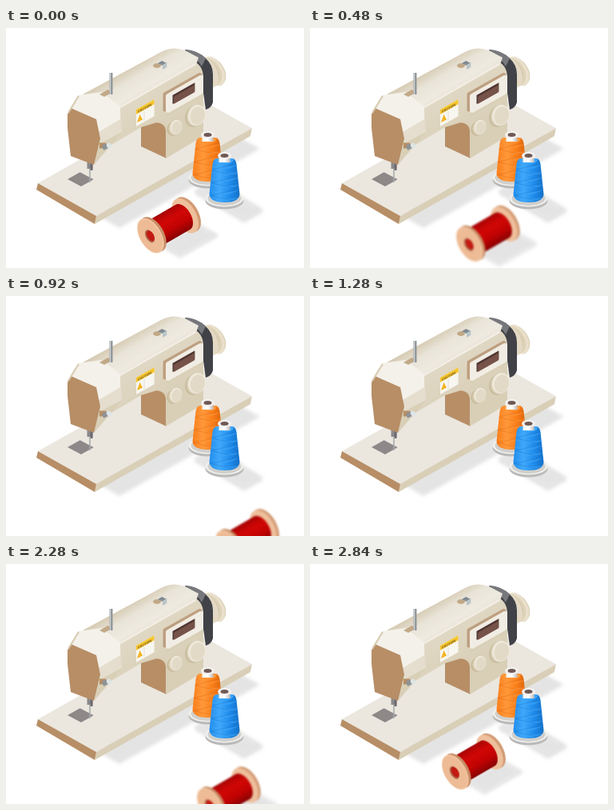
Write an HTML page with a canvas that moves like this. It is 373 px wide and 300 px high and loops after 2.88 s.

```html
<!DOCTYPE html>
<html>
<head>
<meta charset="utf-8">
<style>
html, body { margin: 0; width: 100%; height: 100%; overflow: hidden; background: #fff; }
canvas { display: block; width: 373px; height: 300px; }
</style>
</head>
<body>
<canvas id="stage" width="373" height="300"></canvas>
<script>
const W = 373, H = 300, LOOP = 2880;
const TILT = -Math.PI / 6;
const AXIS = { x: 0.87, y: -0.49 };
const BROWN = '#b78e66', SHADE = '#e4e4e4', CREAM = '#f1ede4', BEIGE = '#d9cfb7', TAN = '#c8bb9b';

const newLayer = () =>
  Object.assign(document.createElement('canvas'), { width: W, height: H }).getContext('2d');
const stage = document.getElementById('stage').getContext('2d');
const backdrop = newLayer(), spool = newLayer();
let g = backdrop;

function shape(fill, path) {
  g.fillStyle = fill;
  g.fill(new Path2D(path));
}

// The edge (x1, y1)-(x2, y2) swept along the machine's long axis.
function sweep(fill, x1, y1, x2, y2, length, rounding = 0) {
  const dx = length * AXIS.x, dy = length * AXIS.y;
  const quad = new Path2D(`M${x1} ${y1}L${x2} ${y2}l${dx} ${dy}L${x1 + dx} ${y1 + dy}Z`);
  g.fillStyle = g.strokeStyle = fill;
  g.fill(quad);
  if (rounding) {
    g.lineJoin = 'round';
    g.lineWidth = rounding;
    g.stroke(quad);
  }
}

function oval(fill, x, y, rx, ry, tilt = 0) {
  g.beginPath();
  g.ellipse(x, y, rx, ry, tilt, 0, Math.PI * 2);
  g.fillStyle = fill;
  g.fill();
}

function line(color, width, x, y, dx, dy) {
  g.strokeStyle = color;
  g.lineWidth = width;
  g.beginPath();
  g.moveTo(x, y);
  g.lineTo(x + dx, y + dy);
  g.stroke();
}

function ramp(x1, y1, x2, y2, ...colors) {
  const r = g.createLinearGradient(x1, y1, x2, y2);
  colors.forEach((c, i) => r.addColorStop(i / (colors.length - 1), c));
  return r;
}

function blurred(radius, draw) {
  g.save();
  g.filter = `blur(${radius}px)`;
  draw();
  g.restore();
}

function drawBase() {
  blurred(2, () => {
    sweep(SHADE, 90, 220, 142, 250, 202);
    sweep(SHADE, 240, 205, 298, 239, 22, 8);
  });
  sweep('#ebe7df', 40, 194, 113, 235, 224);
  sweep(BEIGE, 113, 235, 111, 245, 224);
  shape(BROWN, 'M40 194L113 235L111 245L38 202Z');
  sweep('#8e8889', 77, 189, 94, 198, 18);
}

function drawWheel() {
  const rings = [[262, 18, TAN], [260, 20, '#e9dfca'], [257, 18, '#ddd1b7'], [255, 16, TAN], [251, 21, '#e3d9c4']];
  for (const [x, r, color] of rings) oval(color, x, 54 + (262 - x) * 0.1, r * 0.62, r, TILT);
}

function drawArm() {
  shape('#414247', 'M224 27Q240 28 250 38Q259 46 259 58V93Q257 100 250 102L244 60Q240 42 224 34Z');
  shape('#77787c', 'M224 27Q240 28 250 38L245 48Q238 36 224 33Z');
  shape(BROWN, 'M169 120L196 110L204 122L201 163L169 148Z');
  shape(BEIGE, 'M200 163V128Q199 119 188 118L247 80V135Z');
  shape(ramp(165, 65, 210, 130, '#e2dac8', BEIGE),
    'M140 98L236 42Q246 47 247 60V103L205 124Q199 117 189 118L169 124L132 146Z');
  shape(ramp(150, 50, 175, 92, '#d4c8af', '#e9e4d8', '#eeeae0', '#e6dfd1'),
    'M96 83L194 30Q209 22 224 28L241 37L238 46L143 100Z');
  line('#f4f0e8', 1.6, 143, 99, 94, -54);
}

function drawHead() {
  line('#8b898c', 7, 105, 164, 0, 12);
  line('#6c6a70', 3, 107, 166, 0, 12);
  line('#a9a9ad', 1.6, 105, 176, 0, 17);
  shape(BEIGE, 'M117 138L145 130L132 146L110 171Z');
  shape('#e5decf', 'M113 114L143 98L145 130L118 144Z');
  shape('#f4f1ea', 'M90 84L120 80L143 98L143 114L116 130L113 114L80 100Z');
  shape(BROWN, 'M81 100L113 114L118 138L110 171L81 160L77 125V108Z');
  line('#d8cbb1', 2, 78, 106, 13, -21);
  line(BROWN, 7, 117, 147, 8, 0);
  line('#8c9296', 6, 121, 150, 6, -3);
  oval('#dfe4e6', 129, 147, 3, 3.5, TILT);
}

function drawFittings() {
  sweep('#c2a988', 117, 83, 123, 86, 12);
  line('#8f9598', 4, 131.5, 56, 0, 27);
  line('#d0d6d8', 1.3, 130.5, 56, 0, 27);
  oval('#c2a988', 189, 47, 5, 3);
  sweep('#7f8b91', 190, 44, 196, 47, 6);
  sweep('#b9c4c8', 196, 46, 196, 52, 6);
}

function drawLabel() {
  sweep('#f8f6f0', 163, 102, 163, 123, 26);
  sweep('#f6c52c', 163, 102, 163, 108, 26);
  shape('#f0b51e', 'M164 118L167.5 108L171 114.5Z');
  line('#d9d4cc', 0.7, 173, 104, 0, 12);
  g.save();
  g.transform(1, -0.52, 0, 1, 165, 106);
  g.fillStyle = '#765c24';
  g.font = 'bold 4px Roboto, sans-serif';
  g.fillText('CAUTION', 0, 0);
  g.restore();
}

function drawPanel() {
  sweep('#bd9f80', 199, 83, 199, 102, 50, 5);
  sweep(BEIGE, 203, 87, 203, 106, 47, 5);
  sweep(CREAM, 203, 85, 203, 103, 47, 6);
  sweep('#4f3632', 208.5, 84, 208.5, 95, 32);
  sweep('#765249', 210, 86, 210, 95, 30);
}

function drawKnob(x, y, r) {
  [TAN, BEIGE, '#f0eadc'].forEach((color, i) => oval(color, x - 4 + 2 * i, y + 2 - i, r * 0.83, r, 0.25));
  oval('#e2d9c6', x + 0.8, y + 0.6, r * 0.7, r * 0.88, 0.25);
}

function drawCone(x, y, light, main, dark) {
  oval('#b9b9b9', 0 + x, y + 55, 24, 10.5);
  oval('#f0efec', x, y + 52, 24, 10.5);
  oval('#d0cfcc', x, y + 52, 21, 9);
  g.save();
  g.translate(x, y);
  const cone = new Path2D('M-10 2Q-14 3 -15 9L-19 47Q-18 57 0 57Q18 57 19 47L15 9Q14 3 10 2Z');
  g.fillStyle = ramp(-19, 0, 19, 0, main, light, main, dark);
  g.fill(cone);
  g.clip(cone);
  oval(light, 0, 4, 11, 5);
  g.globalAlpha = 0.5;
  for (let i = 0; i < 6; i++) {
    const top = 8 + i * 8, side = i % 2 ? 1 : -1;
    shape(light, `M${-20 * side} ${top}Q0 ${top + 14} ${20 * side} ${top + 2}Q0 ${top + 8} ${-20 * side} ${top}`);
    line(dark, 0.7, -20 * side, top, 40 * side, 9);
  }
  g.restore();
  line(ramp(x - 8, 0, x + 8, 0, '#f5f1ed', '#fff', '#b8b1ad'), 14, x, y - 1, 0, 8);
  oval('#f4f1ef', x, y - 1.5, 8.5, 4.5);
  oval('#6f5954', x, y - 1.5, 5, 2.5);
}

function drawBackdrop() {
  g.fillStyle = '#fff';
  g.fillRect(0, 0, W, H);
  drawBase();
  drawWheel();
  drawArm();
  drawHead();
  drawFittings();
  drawLabel();
  drawPanel();
  drawKnob(239, 109, 13);
  drawKnob(213, 124, 9);
  drawCone(252.5, 135, '#ff983a', '#f97d18', '#d9620c');
  drawCone(273.5, 161, '#40a8fa', '#1f8cec', '#1470c8');
}

// Local x runs along the spool's axis, y across it.
function drawSpool() {
  const disc = (fill, x, size = 1) => oval(fill, x, 0, 13.5 * size, 24 * size);
  blurred(2, () => sweep(SHADE, 195, 272, 218, 285, 52, 4));
  g.save();
  g.translate(180.5, 260);
  g.rotate(TILT);
  disc('#d29a73', 54);
  disc('#eebf9b', 50.5);

  const thread = new Path2D('M5 -18H47A10.5 18 0 0 1 47 18H5Z');
  g.save();
  g.fillStyle = ramp(0, -18, 0, 18, '#b40506', '#d90806', '#ca0303', '#8d0204');
  g.fill(thread);
  g.clip(thread);
  g.globalAlpha = 0.28;
  g.strokeStyle = '#690004';
  g.lineWidth = 0.8;
  for (let x = 2; x < 62; x += 2.6) {
    g.beginPath();
    g.ellipse(x, 0, 10.5, 18, 0, -Math.PI / 2, Math.PI / 2);
    g.stroke();
  }
  g.restore();

  disc('#c98e66', 4);
  disc('#f5cbaa', 0.5);
  disc('#edbb95', 0, 0.94);
  disc('#a95f45', -0.5, 0.36);
  disc('#c31912', 0.5, 0.3);
  g.restore();
}

function ease(u) {
  const v = Math.min(1, Math.max(0, u));
  return (1 - Math.cos(Math.PI * v)) / 2;
}

function distance(t) {
  const start = 190, end = 2900, travel = 1420;
  return 187 * Math.min(ease((t - start) / travel), ease((end - t) / travel));
}

function frame() {
  const shift = distance(performance.now() % LOOP);
  stage.drawImage(backdrop.canvas, 0, 0);
  stage.filter = `blur(${Math.min(1.2, shift / 4)}px)`;
  stage.drawImage(spool.canvas, shift, shift * 0.56);
  stage.filter = 'none';
  requestAnimationFrame(frame);
}

drawBackdrop();
g = spool;
drawSpool();
frame();
</script>
</body>
</html>
```
